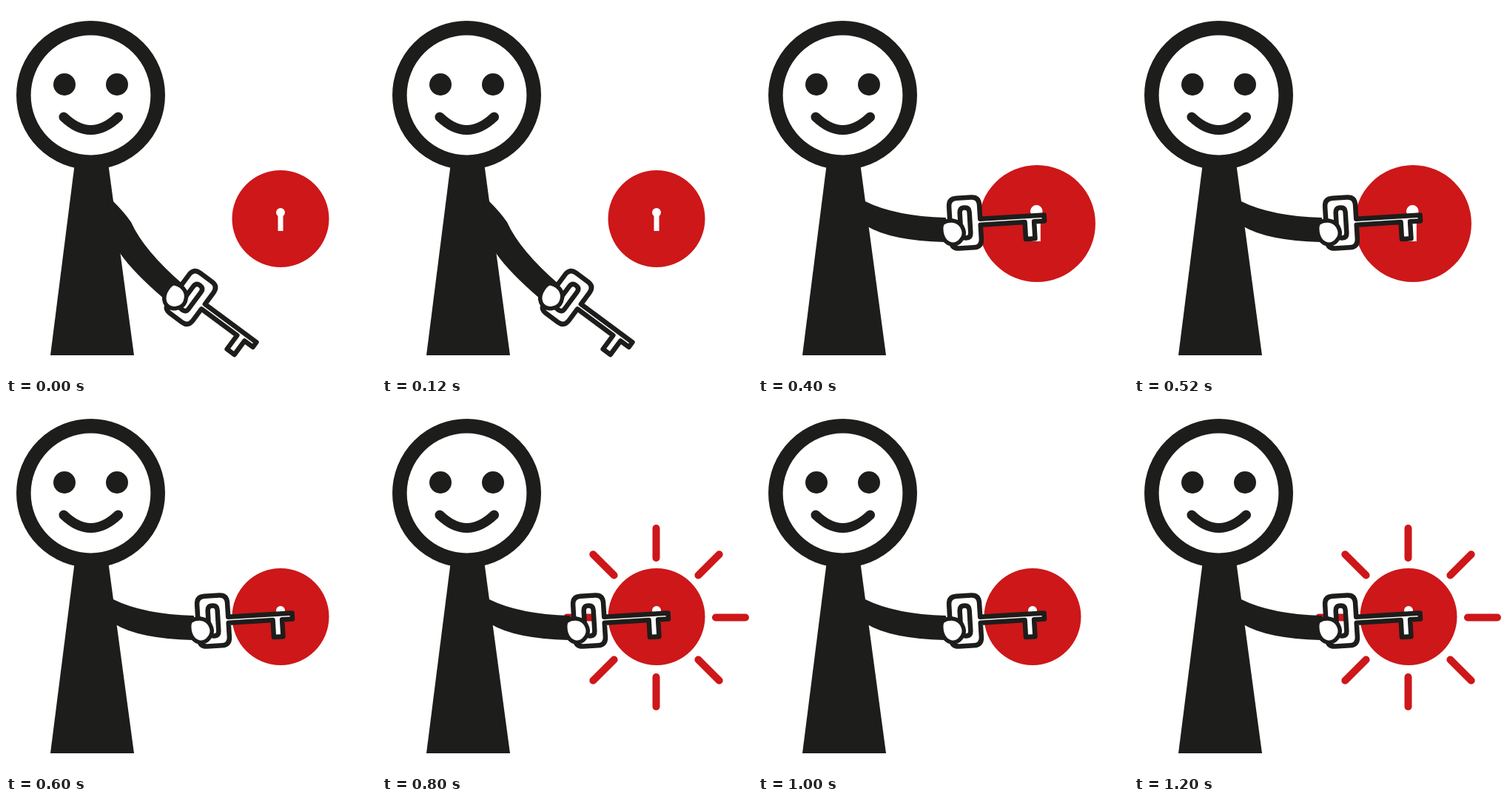
Animation, 500 px wide and 500 px high, one loop 1.4 s. Source, as an HTML page:

```html
<!DOCTYPE html>
<html lang="en">
<head>
<meta charset="utf-8">
<title>Key and lock</title>
<style>
  html, body { margin: 0; width: 100%; height: 100%; overflow: hidden; background: #fff; }
  svg { display: block; width: 100%; height: 100%; }
</style>
</head>
<body>
<svg viewBox="0 0 500 500">
  <g id="rays" stroke="#cd1719" stroke-width="10" stroke-linecap="round"></g>
  <circle id="disc" fill="#cd1719"/>
  <path id="keyhole" fill="#fff"/>

  <g fill="#1d1d1b">
    <path d="M93 212H138L173 472H60Z"/>
    <circle cx="79" cy="106" r="15"/>
    <circle cx="150" cy="106" r="15"/>
    <path id="arm"/>
  </g>
  <g fill="none" stroke="#1d1d1b">
    <circle cx="114.5" cy="120.5" r="90.7" stroke-width="19.6"/>
    <path d="M78 150Q114.5 185 151.500 150" stroke-width="13" stroke-linecap="round"/>
  </g>

  <g id="key" fill="#fff" stroke="#1d1d1b" stroke-width="6.500" stroke-linejoin="round">
    <path fill-rule="evenodd" d="M-10 -34H10Q20.500 -34 20.500 -23V-4H107V4H93V27H80.500V4H20.500V23Q20.500 34 10 34H-10Q-20.500 34 -20.500 23V-23Q-20.500 -34 -10 -34Z
      M0 -20.500Q-6.500 -20.500 -6.500 -14V14Q-6.500 20.500 0 20.500Q6.500 20.500 6.500 14V-14Q6.500 -20.500 0 -20.500Z"/>
    <path stroke-width="5.500" d="M-31 -1Q-25 -5 -17 -4Q-6 -2 -3 9Q-1 17 -7 23Q-12 29 -20 28Q-29 26 -32 15Q-34 5 -31 -1Z"/>
  </g>
</svg>
<script>
const STEP = 200;
const $ = id => document.getElementById(id);

const low = { x: 250, y: 394, turn: 36.5,
  arm: "M138 255L145 264Q160 279 169 292Q186 330 239 376L214 396Q172 360 154 334L140 320Z" };
const mid = { x: 271, y: 356, turn: 21.5,
  arm: "M138 255L145 260Q160 268 170 278Q200 314 256 339L234 375Q180 346 151 307L138 300Z" };
const high = { x: 280, y: 293, turn: -3.5,
  arm: "M138 262L145 264Q185 284 254 286L252 319Q180 317 148 298L138 295Z" };

const small = { x: 371, y: 287.5, r: 65.5, hole: [371, 279, 6, 3.5, 304] };
const big = { x: 377, y: 294, r: 79, hole: [376.3, 277.3, 8.3, 5.5, 318] };

const steps = [
  { pose: low, lock: small },
  { pose: mid, lock: small },
  { pose: high, lock: big },
  { pose: high, lock: small },
  { pose: high, lock: small, lit: true },
  { pose: high, lock: small },
  { pose: high, lock: small, lit: true }
];

function set(id, attrs) {
  for (const name in attrs) $(id).setAttribute(name, attrs[name]);
}

function holePath([x, y, r, half, bottom]) {
  return `M${x - r} ${y}a${r} ${r} 0 1 1 ${2 * r} 0a${r} ${r} 0 1 1 ${-2 * r} 0Z` +
    `M${x - half} ${y}H${x + half}V${bottom}H${x - half}Z`;
}

for (let i = 0; i < 8; i++) {
  const ray = document.createElementNS("http://www.w3.org/2000/svg", "path");
  ray.setAttribute("d", "M80.5 0H120.5");
  ray.setAttribute("transform", `translate(370.5 288.5) rotate(${i * 45})`);
  $("rays").append(ray);
}

function draw(time) {
  const { pose, lock, lit } = steps[Math.floor(time / STEP) % steps.length];
  set("arm", { d: pose.arm });
  set("key", { transform: `translate(${pose.x} ${pose.y}) rotate(${pose.turn})` });
  set("disc", { cx: lock.x, cy: lock.y, r: lock.r });
  set("keyhole", { d: holePath(lock.hole) });
  set("rays", { visibility: lit ? "visible" : "hidden" });
}

const start = performance.now();
function tick() {
  draw(performance.now() - start);
  requestAnimationFrame(tick);
}
tick();
</script>
</body>
</html>
```
